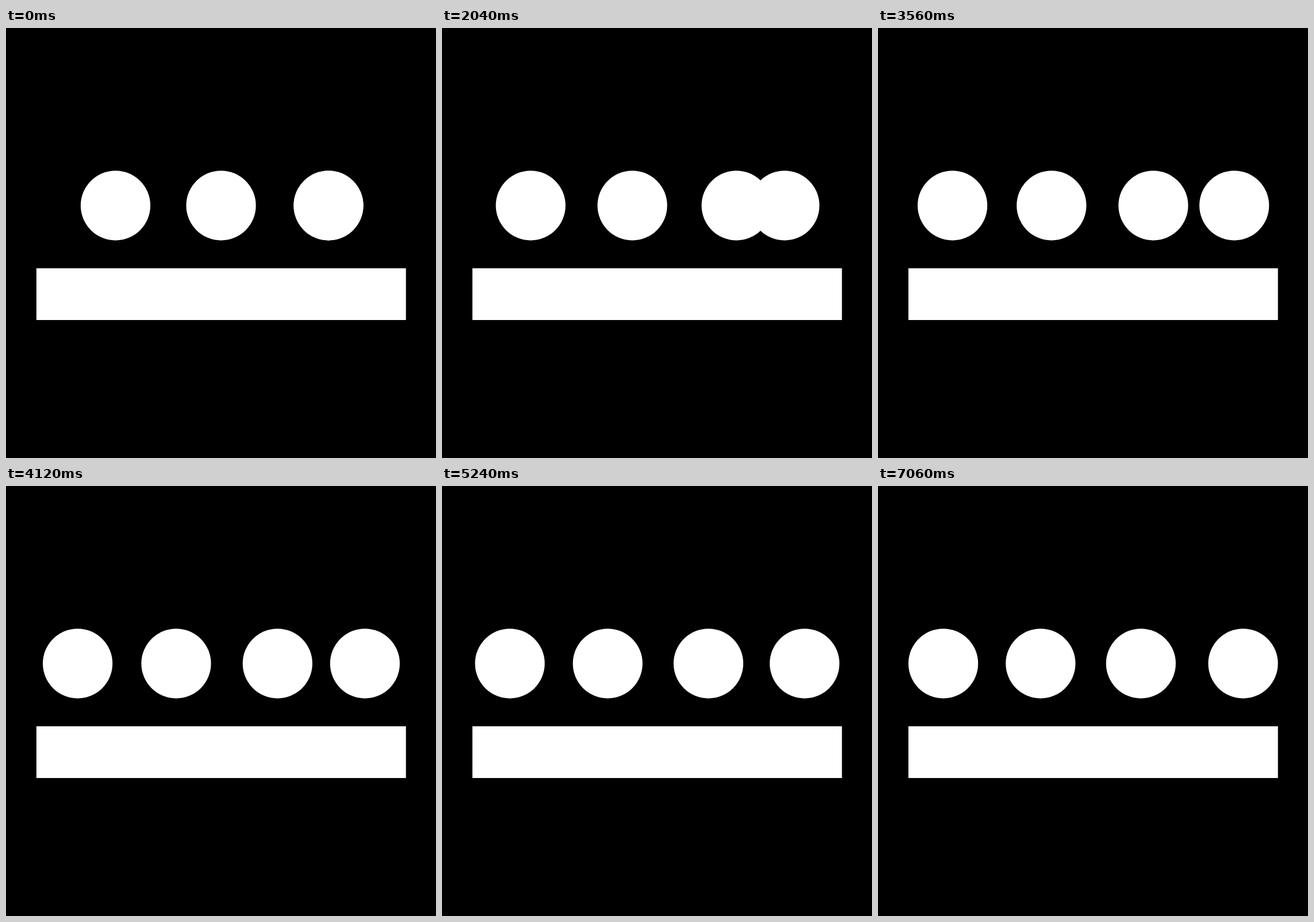
An HTML page for the animation above (8500 ms loop, 748x748 px).

```html
<!DOCTYPE html>
<html lang="en">
<head>
<meta charset="utf-8">
<title>Three dots become four</title>
<style>
  html, body { margin: 0; width: 100%; height: 100%; overflow: hidden; background: #000; }
  svg { display: block; width: 100%; height: 100%; }
</style>
</head>
<body>
<svg viewBox="0 0 748 748" fill="#fff">
  <rect width="748" height="748" fill="#000"/>
  <rect x="52.9" y="418" width="642.8" height="90"/>
  <g id="dots"></g>
</svg>
<script>
  const LOOP = 8500, HOLD = 1500, STEPS = 120;
  // Centre x of each dot: [start, end]. The last two start stacked.
  const paths = [[190.5, 113.5], [374.1, 282.8], [561, 457.3], [561, 635.1]];

  const group = document.getElementById('dots');
  const dots = paths.map(() => {
    const dot = document.createElementNS('http://www.w3.org/2000/svg', 'circle');
    dot.setAttribute('cy', 308.8);
    dot.setAttribute('r', 60.6);
    return group.appendChild(dot);
  });

  // Steps last 100, 20 and 20 ms in turn.
  function stepAt(ms) {
    if (ms < HOLD) return 0;
    const since = ms - HOLD, rest = since % 140;
    const sub = rest < 100 ? 0 : rest < 120 ? 1 : 2;
    return Math.min(STEPS - 1, 1 + 3 * Math.floor(since / 140) + sub);
  }

  // Closed form of cubic-bezier(0, 1, 1, 1).
  function ease(t) {
    const s = 0.5 - Math.sin(Math.asin(1 - 2 * t) / 3);
    return 1 - (1 - s) ** 3;
  }

  function draw(ms) {
    const p = ease(Math.max(0, (stepAt(ms) - 0.5) / STEPS));
    paths.forEach(([from, to], i) => {
      dots[i].setAttribute('cx', (from + (to - from) * p).toFixed(2));
    });
  }

  const start = performance.now();
  function tick() {
    draw((performance.now() - start) % LOOP);
    requestAnimationFrame(tick);
  }
  tick();
</script>
</body>
</html>
```
